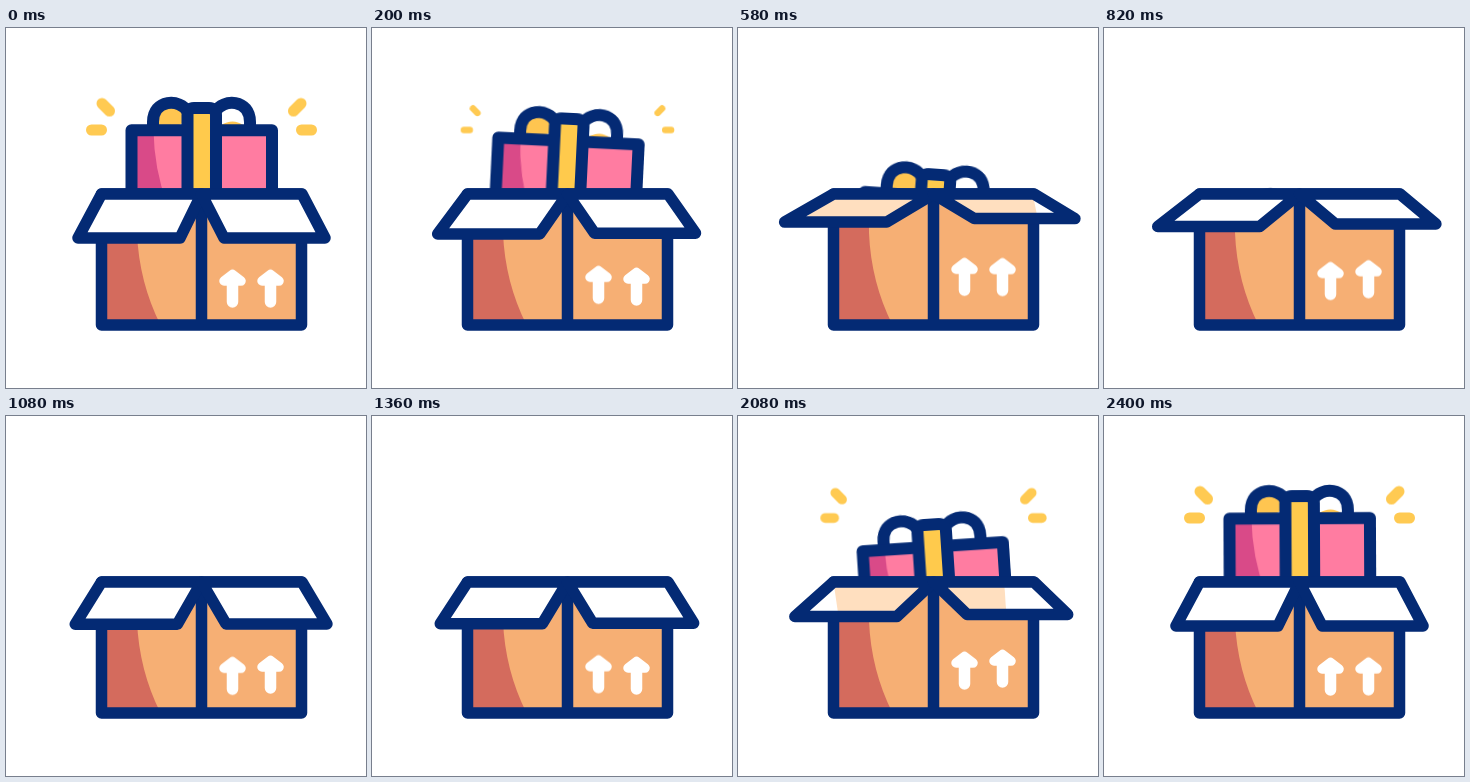
An HTML page for the animation above (2420 ms loop, 360x360 px).

```html
<!DOCTYPE html>
<html lang="en">
<head>
<meta charset="utf-8">
<title>Gift box</title>
<style>
  :root { --sine: cubic-bezier(.364, 0, .636, 1); }
  html, body { margin: 0; width: 100%; height: 100%; overflow: hidden; background: #fff; }
  svg { display: block; width: 100vw; height: 100vh; }

  .line { fill: none; stroke: #042a74; stroke-width: 11.5; stroke-linecap: round; stroke-linejoin: round; }
  .tilt .line { stroke-width: 12; }
  .flap { fill: #fff; }
  .flap.line { fill: none; }
  .ray { stroke: #ffca52; stroke-width: 11; stroke-linecap: round; }
  .peach { fill: #ffdfbf; }

  /* The flaps and arrows swing twice per loop */
  .flap, .peach, .arrow { animation: 605ms var(--sine) infinite alternate; }
  .flap.l { animation-name: flapL; }
  .flap.r { animation-name: flapR; }
  .peach.l { animation-name: peachL; }
  .peach.r { animation-name: peachR; }
  .arrow { animation-name: bob; }
  .arrow.l { animation-delay: -30ms; }
  .arrow.r { animation-delay: -2385ms; }

  @keyframes flapL {
    from { d: path("M95.5 166L195.5 166L174 210L72 210Z"); }
    to   { d: path("M95.5 166L195.5 166L148.5 194L46.5 194Z"); }
  }
  @keyframes flapR {
    from { d: path("M296 166L195.5 166L218 210L319 210Z"); }
    to   { d: path("M296 166L195.5 166L236.5 190.5L337 190.5Z"); }
  }
  @keyframes peachL {
    from { d: path("M95.5 166L195.5 166L174 210L157 210Z"); }
    to   { d: path("M95.5 166L195.5 166L148.5 194L62 194Z"); }
  }
  @keyframes peachR {
    from { d: path("M224 166L195.5 166L218 210L222 210Z"); }
    to   { d: path("M295 166L195.5 166L236.5 190.5L300 190.5Z"); }
  }
  @keyframes bob { to { transform: translateY(-11.8px); } }

  .drop, .tilt, .glow, .bowGlow, .ray { animation: 2420ms linear infinite; }

  .drop { animation-name: drop; animation-timing-function: var(--sine); }
  @keyframes drop {
    0%, 100% { transform: translateY(0); }
    38%, 62% { transform: translateY(95px); }
  }

  .tilt { animation-name: tilt; transform-origin: 196px 118px; }
  @keyframes tilt {
    0% { transform: rotate(0deg); animation-timing-function: cubic-bezier(.33, .52, .64, 1); }
    19% { transform: rotate(4.4deg); animation-timing-function: cubic-bezier(.36, 0, .67, .48); }
    38%, 62% { transform: rotate(0deg); animation-timing-function: cubic-bezier(.33, .52, .64, 1); }
    81% { transform: rotate(-4.1deg); animation-timing-function: cubic-bezier(.36, 0, .67, .48); }
    100% { transform: rotate(0deg); }
  }

  .glow { animation-name: glow; animation-timing-function: step-end; }
  @keyframes glow {
    0% { opacity: 0; }
    10% { opacity: 1; }
    29% { opacity: 0; }
    67.8% { opacity: 1; }
    90% { opacity: 0; }
  }

  .bowGlow { animation-name: bowGlow; animation-timing-function: step-end; }
  @keyframes bowGlow {
    0% { opacity: 1; }
    33% { opacity: 0; }
    94% { opacity: 1; }
  }

  .ray { animation-name: ray; }
  @keyframes ray {
    0%, 5% { transform: scale(1); }
    13%, 78% { transform: scale(0); }
    87%, 100% { transform: scale(1); }
  }
</style>
</head>
<body>
<svg viewBox="0 0 360 360">
  <defs>
    <g id="arrow" fill="none" stroke="#fff" stroke-linecap="round" stroke-linejoin="round">
      <path d="M-8.5 253L0 246.5L8.5 253Z" fill="#fff" stroke-width="9.5"/>
      <path d="M0 252V274" stroke-width="11.5"/>
    </g>
  </defs>

  <g transform="translate(101 102)"><path class="ray" d="M-5.5 0H-15.5"/></g>
  <g transform="translate(108 87.5)"><path class="ray" d="M-4.5 -4.5L-12 -12"/></g>
  <g transform="translate(290 102)"><path class="ray" d="M5.5 0H15.5"/></g>
  <g transform="translate(283 87.5)"><path class="ray" d="M4.5 -4.5L12 -12"/></g>

  <g class="drop"><g class="tilt">
    <path d="M147 101V94C147 71 174 70 182 84V101ZM244 101V94C244 71 217 70 209 84V101Z" fill="#fff"/>
    <g class="bowGlow" fill="#ffc550">
      <path d="M147 101V94C147 71 174 70 182 84V92L166 101Z"/>
      <path d="M215 97Q227 90 237 97Z"/>
    </g>
    <path class="line" d="M147 100V94C147 71 174 70 182 84M244 100V94C244 71 217 70 209 84"/>
    <path d="M125.5 102.3H266V176H125.5Z" fill="#ff7ca1"/>
    <path d="M125.5 102.3H147.5Q148 140 161 176H125.5Z" fill="#d94a88"/>
    <path class="line" d="M125.5 102.3H266V176H125.5Z"/>
    <g id="ribbon">
      <path d="M181.5 176V87Q181.500 80 188 80H203Q210 80 210 87V176Z" fill="#ffca4c"/>
      <path class="line" d="M181.500 176V87Q181.500 80 188 80H203Q210 80 210 87V176Z"/>
    </g>
  </g></g>

  <path d="M95.500 166H295.500V297H95.500Z" fill="#f6af74"/>
  <path d="M95.500 166H131V205Q133 254 154.500 297H95.500Z" fill="#d46b5d"/>
  <path class="line" d="M95.500 166H295.500V297H95.500ZM195.500 166V297"/>

  <g class="arrow l"><use href="#arrow" x="226.500"/></g>
  <g class="arrow r"><use href="#arrow" x="264.500"/></g>

  <path class="flap l" d="M95.500 166L195.500 166L174 210L72 210Z"/>
  <path class="flap r" d="M296 166L195.500 166L218 210L319 210Z"/>
  <g class="glow">
    <path class="peach l" d="M95.500 166L195.500 166L174 210L157 210Z"/>
    <path class="peach r" d="M224 166L195.500 166L218 210L222 210Z"/>
  </g>
  <path class="flap l line" d="M95.500 166L195.500 166L174 210L72 210Z"/>
  <path class="flap r line" d="M296 166L195.500 166L218 210L319 210Z"/>
</svg>
</body>
</html>
```
